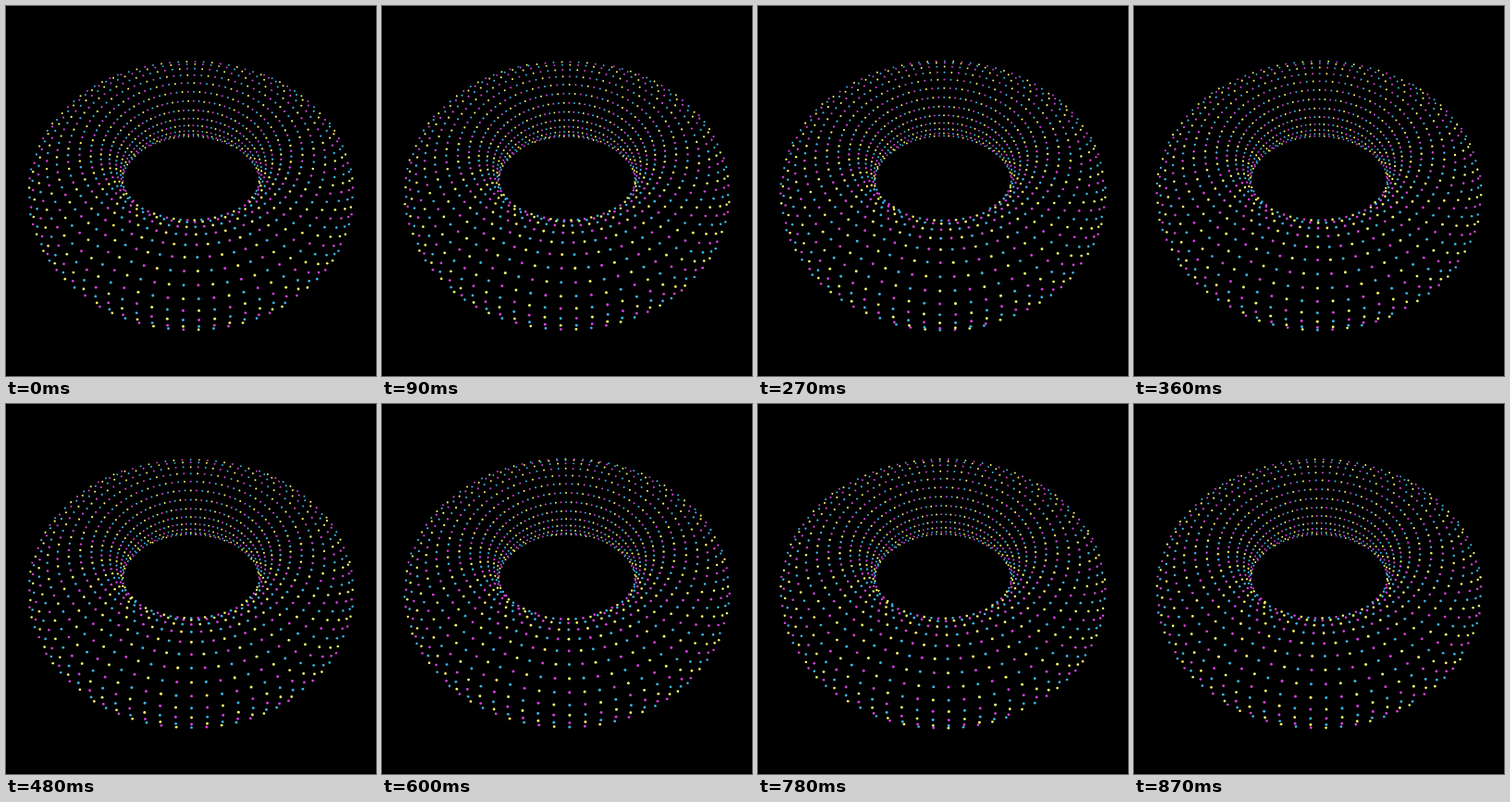
An HTML page with a canvas for the animation above (0.9 s loop, 400 by 400 pixels).

```html
<!DOCTYPE html>
<html>
<head>
<meta charset="utf-8">
<style>
  html, body { margin: 0; height: 100%; background: #000; overflow: hidden; }
  canvas { display: block; }
</style>
</head>
<body>
<canvas width="400" height="400"></canvas>
<script>
const ctx = document.querySelector('canvas').getContext('2d');
const TAU = 2 * Math.PI, LOOP = 900, STEP = 30;
const COLUMNS = 84, ROWS = 28;
const COLORS = ['#f6f468', '#38b4e4', '#d440de'];

// Lengths are in units of the tube radius
const RING = 2.577, DISTANCE = 8.465, LIFT = 0.4805, FOCAL = 395, DOT = 9;
const TILT = 52.07 * Math.PI / 180, SIN = Math.sin(TILT), COS = Math.cos(TILT);
const FIRST_ROW = -11, START_ANGLE = 54 * Math.PI / 180;

// Tilt (side, forward, up) into (x, y, towards the viewer)
const tilt = (side, forward, up) =>
  [side, up * COS - forward * SIN, forward * COS + up * SIN];

function drawDot(around, tube, color) {
  const s = Math.sin(around), c = Math.cos(around);
  const out = Math.cos(tube), up = Math.sin(tube), radius = RING + out;
  const [nx, ny, nz] = tilt(out * s, out * c, up);
  const [x, y0, z] = tilt(radius * s, radius * c, up);
  const y = y0 + LIFT, depth = DISTANCE - z;
  if (depth * nz - x * nx - y * ny < 0) return; // faces away

  const scale = FOCAL / depth;
  ctx.fillStyle = color;
  ctx.beginPath();
  ctx.arc(200 + x * scale, 200 - y * scale, DOT / depth, 0, TAU);
  ctx.fill();
}

function draw(now) {
  const phase = Math.floor(now % LOOP / STEP) * STEP / LOOP;
  ctx.fillStyle = '#000';
  ctx.fillRect(0, 0, 400, 400);
  // Each loop turns the ring by one column and rolls the tube by two rows
  for (let i = 0; i < COLUMNS; i++) {
    const around = (i - 1.5 + phase) * TAU / COLUMNS;
    for (let j = 0; j < ROWS; j++) {
      const row = j + FIRST_ROW;
      const tube = START_ANGLE + (row + 2 * phase) * TAU / ROWS;
      drawDot(around, tube, COLORS[(i + row + ROWS - 1) % 3]);
    }
  }
  requestAnimationFrame(draw);
}
draw(0);
</script>
</body>
</html>
```
